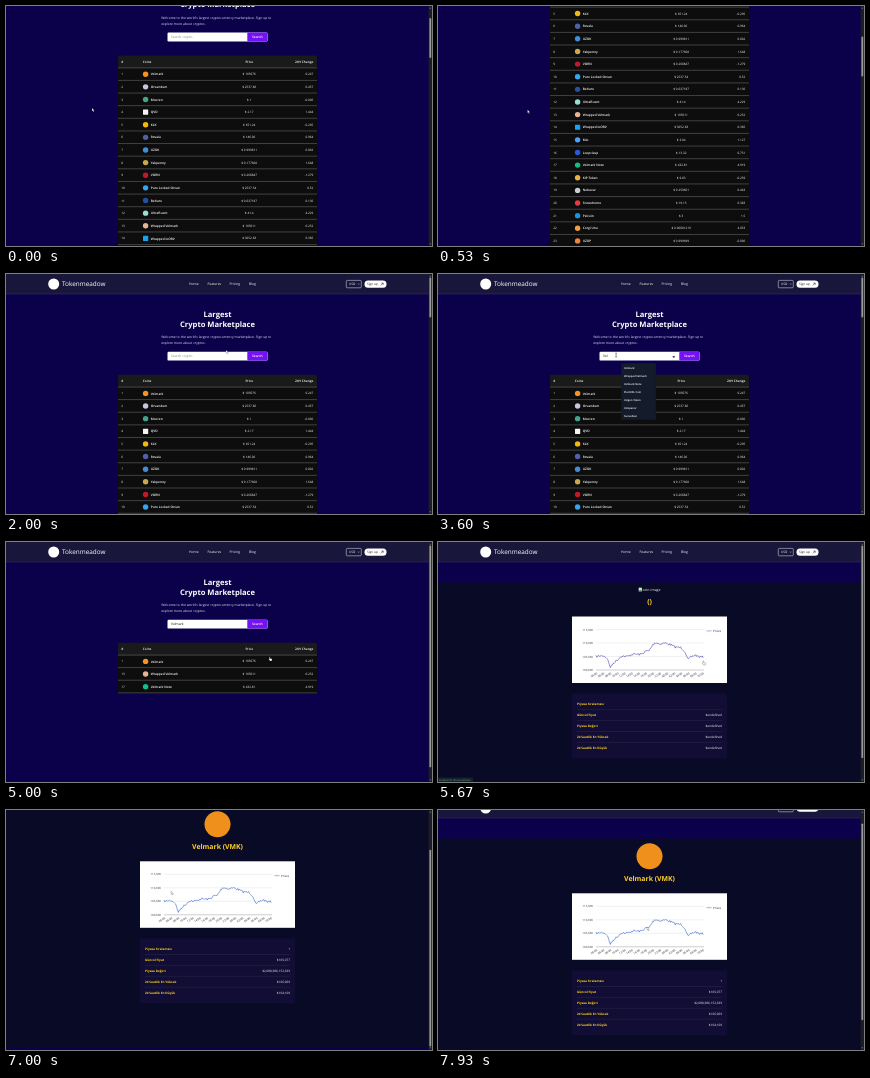
An HTML page for the animation above (8000 ms loop, 426 by 240 pixels).

```html
<!DOCTYPE html>
<html lang="en">
<head>
<meta charset="utf-8">
<title>Crypto Marketplace</title>
<style>
  html, body { margin: 0; width: 100%; height: 100%; overflow: hidden; background: #0b004a; }
  svg { display: block; width: 100vw; height: 100vh; font-family: "Open Sans", "Noto Sans", sans-serif; text-rendering: geometricPrecision; }
</style>
</head>
<body>
<svg id="stage" viewBox="0 0 426 240"></svg>
<script>
const LOOP = 8000, PITCH = 12.63, FIRST_ROW = 119.4, HOME_HEIGHT = 1400;
const GOLD = '#ffd21f', PURPLE = '#0b004a';

const coins = `Velmark|105076|0.247|#f7931a
Orvandum|2537.86|0.457|#c4c8d8
Mooren|1|-0.006|#3fa58c
QVD|2.17|1.444|#f4f4f4|s
KLK|651.24|-0.295|#f0b90b
Rovala|146.06|0.964|#4d61a8
UZDK|0.999811|0.002|#3d8fd8
Yakpenny|0.177608|1.648|#c9a94a
VORN|0.268847|-1.279|#c2182f
Puro Locked Orvan|2537.54|0.52|#35a5f0
Belturo|0.637187|0.136|#2450a4
Ultrafluent|41.4|4.229|#9adfd4
Wrapped Velmark|105011|0.252|#e6b394
Wrapped loORV|3052.83|0.366|#17a2ee|s
Mio|3.04|1.127|#4da2ff
Loopclasp|13.32|0.751|#2a5ada
Velmark Note|432.81|4.919|#0ac18e
KIP Token|9.03|-0.259|#e8b33c
Nebuvar|0.259601|0.443|#c9ccd0
Snowdrome|19.15|0.383|#e23b40
Pelcoin|3|1.5|#1295e2
Corgi Uno|0.00001219|4.053|#eda03c
UZDP|0.999699|-0.006|#ed8740
Fernia|0.15971|4.024|#dcdcdc
WORV|2536.85|0.47|#e0e4f0
Wrapped eORV|2712.3|0.333|#4d4fc0
Slimmark|86.25|-2.945|#345d9d
Kelance Bridged UZDM (KLK Quick Chain)|1.001|0.062|#26a17b
Orvina UZDe|1.001|0.019|#b9b9b9
Tavaro|315.73|0.486|#f26822
Jivestep|3.81|-0.245|#e6007a
PlainVEL Coin|28.97|12.515|#e9d53a
Velgen Token|4.54|0.424|#2cc9d8
Coinfort Wrapped VMK|105148|0.258|#1659e8
Gogo|0.00001114|4.399|#4c9a42
Lumo|6.91|1.024|#6ab4d8
Oakcrown|0.89|-0.312|#b06fd0`.split('\n').map((line, i) => {
  const [name, price, change, color, square] = line.split('|');
  return { rank: i + 1, name, price, change, color, square };
});
const suggestions = ['Velmark', 'Wrapped Velmark', 'Velmark Note', 'PlainVEL Coin', 'Velgen Token', 'Velspanor', 'Sunvelken'];

// Times in ms followed by values
const homeScroll = [[0, 51], [300, 110], [600, 178], [900, 246], [1200, 310], [1320, 326], [1430, 310], [1640, 120], [1860, 0]];
const coinScroll = [[6250, 0], [6750, 44], [7150, 44], [7600, 12]];
const pointer = [[0, 86, 102], [600, 90, 104], [1200, 99, 106], [1500, 130, 108], [2000, 220, 76], [2600, 200, 82],
  [3130, 178, 81], [3600, 178, 81], [3780, 193, 93], [3840, 193, 93], [4020, 250, 82], [4200, 250, 82], [5100, 265, 119],
  [5700, 265, 119], [6200, 240, 105], [7000, 165, 81], [7600, 195, 108], [7930, 209, 117]];
const typing = [[3340, 'V'], [3400, 'Ve'], [3470, 'Vel'], [3830, 'Velmark']];
const SUGGEST = [3350, 3830], FILTER = 4080, COIN_PAGE = 5470, CHART = 5540, LOADED = 5900;
const STATUS = [[1500, 1800], [5080, 5900]];

function at(keys, t) {
  if (t <= keys[0][0]) return keys[0].slice(1);
  for (let i = 1; i < keys.length; i++) {
    const a = keys[i - 1], b = keys[i];
    if (t < b[0]) return a.slice(1).map((v, k) => v + (b[k + 1] - v) * (t - a[0]) / (b[0] - a[0]));
  }
  return keys[keys.length - 1].slice(1);
}
const within = ([from, to], t) => t >= from && t < to;

const rect = (x, y, w, h, fill, extra = '') => `<rect x="${x}" y="${y}" width="${w}" height="${h}" fill="${fill}" ${extra}/>`;
const line = (x1, y, x2, color, w = .45) => `<path d="M${x1} ${y}H${x2}" stroke="${color}" stroke-width="${w}"/>`;
const disc = (x, y, r, fill) => `<circle cx="${x}" cy="${y}" r="${r}" fill="${fill}"/>`;
// y is the middle of the line of text
const text = (x, y, s, size = 3.2, { fill = '#fff', weight = 400, anchor = 'start', extra = '' } = {}) =>
  `<text x="${x}" y="${y + size * .35}" font-size="${size}" fill="${fill}" font-weight="${weight}" text-anchor="${anchor}" ${extra}>${s}</text>`;
const bold = { weight: 600 }, mid = { anchor: 'middle' }, end = { anchor: 'end' };

function navBar() {
  const links = [[183, 'Home'], [201.5, 'Features'], [223.5, 'Pricing'], [243, 'Blog']];
  return rect(0, 0, 426, 20, '#19163c') + line(0, 20, 426, '#38345c', .5) +
    disc(47.7, 10, 5.5, '#fff') + text(56, 10, 'Tokenmeadow', 6.4, { weight: 500 }) +
    links.map(([x, s]) => text(x, 10.2, s, 3.4, { weight: 500 })).join('') +
    rect(340.3, 6.4, 15, 7.4, 'none', 'rx="1" stroke="#fff" stroke-width=".45"') + text(343, 10.1, 'USD', 3.2) +
    '<path d="M351.8 9.6l.8.9.8-.9" fill="none" stroke="#fff" stroke-width=".4"/>' +
    rect(358.5, 6.6, 22, 7.1, '#fff', 'rx="3.5"') + text(361, 10.1, 'Sign up', 3.2, { fill: '#222', weight: 500 }) +
    '<path d="M374.8 11.4l2.4-2.4m-1.9 0h1.9v1.9" fill="none" stroke="#222" stroke-width=".5"/>';
}

function tableRow(c, i) {
  const y = FIRST_ROW + i * PITCH;
  const icon = c.square ? rect(137, y - 2.6, 5.2, 5.2, c.color, 'rx=".4"') : disc(139.6, y, 2.7, c.color);
  return text(115.3, y, c.rank, 3.1) + icon + text(144.7, y, c.name, 3.2, bold) +
    text(243.2, y, '$ ' + c.price, 3.1, mid) + text(307.3, y, c.change, 3.1, end) +
    line(112, y + 6.2, 311, '#808080');
}
const table = (list, height) => rect(112, 101, 199, height, '#0d0d0d', 'rx="2"') +
  '<path d="M112 113.2V102.8a2 2 0 0 1 2-2H309a2 2 0 0 1 2 2v10.4z" fill="#1a1a1a"/>' +
  text(115.3, 107, '#', 3.2, bold) + text(136.8, 107, 'Coins', 3.2, bold) +
  text(243.2, 107, 'Price', 3.2, { ...bold, ...mid }) + text(307.3, 107, '24H Change', 3.2, { ...bold, ...end }) +
  line(112, 113.1, 311, '#808080') + list.map(tableRow).join('');

function homePage() {
  const title = { weight: 700, anchor: 'middle' };
  return navBar() + text(211.5, 40.2, 'Largest', 7.6, title) + text(211.5, 50, 'Crypto Marketplace', 7.6, title) +
    text(155.3, 63, "Welcome to the world's largest cryptocurrency marketplace. Sign up to", 3.37, { fill: '#e3e3f0' }) +
    text(155.3, 69.3, 'explore more about cryptos.', 3.37, { fill: '#e3e3f0' }) +
    rect(161.5, 77.8, 100, 8.8, '#fff', 'rx="1.2"') + rect(241.3, 77.8, 20, 8.8, '#7411f5', 'rx="1"') +
    text(251.3, 82.2, 'Search', 3.3, { ...bold, ...mid }) +
    `<g id="query">${text(165, 82.2, '', 3.3)}</g>` +
    '<path id="arrow" d="M234.3 82.2h3l-1.5 1.8z" fill="#111"/>' +
    `<g id="full">${table(coins, 1240)}</g>` +
    `<g id="filtered">${table([0, 12, 16].map(i => coins[i]), 50.2)}</g>` +
    `<g id="suggest">${rect(183.3, 89.3, 34.6, 56.5, '#141b2a', 'rx=".5"')}${
      suggestions.map((s, i) => text(186, 93.6 + i * 8, s, 2.65, bold)).join('')}</g>`;
}

// Knots of the price line, relative to the chart's corner
const priceKnots = [[24, 40], [31, 39], [35, 41.5], [38.5, 51], [41, 47], [47, 42], [49, 39.5], [55, 40], [61, 37.5], [69, 38],
  [74, 34.5], [77, 34.5], [80, 29.5], [83, 26], [88, 27.5], [93, 26.5], [98, 28], [103, 30.5], [109, 31], [113, 35],
  [116, 43.5], [119, 40.5], [123, 38.5], [128, 40.5], [131.5, 40.5]];
function priceLine() {
  let seed = 7, d = '';
  for (let x = 24; x <= 131.5; x += .9) {
    seed = seed * 16807 % 2147483647;
    d += `${d ? 'L' : 'M'}${x.toFixed(1)} ${(at(priceKnots, x)[0] + (seed / 2147483647 - .5) * 2.2).toFixed(2)}`;
  }
  return `<path id="prices" d="${d}" fill="none" stroke="#3366cc" stroke-width=".6" stroke-linejoin="round"/>`;
}
function chart() {
  const dark = { fill: '#444' };
  let s = '';
  for (let i = 0; i < 4; i++) {
    const y = 13 + i * 13.5;
    s += line(24, y, 132, i < 3 ? '#ccc' : '#555', .3) + text(21, y, 115 - 5 * i + ',000', 2.9, { ...dark, ...end });
  }
  for (let i = 0; i < 16; i++) {
    const x = 25 + i * 7.1, label = String((4 + i * 2) % 24).padStart(2, '0') + ':00';
    s += text(x, 56.5, label, 2.8, { fill: '#222', anchor: 'end', extra: `transform="rotate(-32 ${x} 56.5)"` });
  }
  return rect(0, 0, 155, 66.5, '#fff') + `<g id="plot">${s}${priceLine()}${line(134.5, 14.4, 139.5, '#3366cc', .5)}${text(141, 14.4, 'Prices', 2.9, { fill: '#222' })}</g>`;
}

const facts = [['Piyasa Sıralaması', '1'], ['Güncel Fiyat', '$105,077'], ['Piyasa Değeri', '$2,088,386,152,639'],
  ['24 Saatlik En Yüksek', '$106,069'], ['24 Saatlik En Düşük', '$104,109']];
function factList(loaded) {
  return facts.map(([, value], i) => text(150, 10.8 + i * 10.9, loaded ? value : i ? '$undefined' : '', 3.1, end)).join('');
}
function coinPage() {
  const title = { fill: GOLD, weight: 700, anchor: 'middle' };
  const panel = rect(0, 0, 155, 65, '#110d34', 'rx="1.5"') + facts.map(([label], i) =>
    text(5, 10.8 + i * 10.9, label, 3.1, { fill: GOLD, weight: 700 }) +
    (i < 4 ? line(5, 16.2 + i * 10.9, 150, '#39365a', .35) : '')).join('');
  return rect(0, 40.5, 426, 240.5, '#090a26') + navBar() +
    `<g id="pending">${rect(200.7, 45.7, 3.2, 3.6, '#d8e4f4')}<path d="M200.7 49.3l1.6-1.8 1.6 1.8z" fill="#5a9a4a"/>${
      text(204.6, 47.8, 'coin-image', 3.5)}${text(211.5, 60, '()', 7, title)}</g>` +
    `<g id="ready">${disc(211.5, 58.2, 13, '#f0901c')}${text(211.5, 80.8, 'Velmark (VMK)', 6.9, title)}</g>` +
    `<g id="body"><g transform="translate(134 0)">${chart()}</g><g transform="translate(134 77)">${panel}<g id="waiting">${
      factList(false)}</g><g id="values">${factList(true)}</g></g></g>`;
}

const stage = document.getElementById('stage');
stage.innerHTML = rect(0, 0, 426, 240, PURPLE) +
  `<g id="home">${homePage()}</g><g id="coin">${coinPage()}</g>` +
  rect(422.6, 0, 3.4, 240, '#1c1c26') + '<path d="M423.4 2.6l.9-1.2.9 1.2zM423.4 237.4l.9 1.2.9-1.2z" fill="#9a9a9a"/>' +
  rect(423.4, 4, 1.8, 40, '#9a9a9a', 'id="thumb" rx=".9"') +
  `<g id="status">${rect(0, 235.4, 35, 4.6, '#17212b', 'rx=".6"')}${text(1, 237.7, 'localhost:5173/coin/velmark', 2.4, { fill: '#57b8a0' })}</g>` +
  `<g id="pointer"><path id="tip" d="M0 0v3.3l.8-.7.6 1.3.6-.3-.6-1.2h1z" fill="#fff" stroke="#111" stroke-width=".2"/>
   <path id="beam" d="M-.7-2h1.4M0-2v4M-.7 2h1.4" stroke="#111" stroke-width=".45" fill="none"/>
   <path id="hand" d="M0 0q.5-.4.8.2v1.3l1.5.4q.5.2.4.8l-.4 1.4h-1.6l-1.3-1.7.6-.3z" fill="#fff" stroke="#111" stroke-width=".25"/></g>`;

const $ = Object.fromEntries([...stage.querySelectorAll('[id]')].map(e => [e.id, e]));
const show = (e, on) => e.setAttribute('display', on ? 'inline' : 'none');
const move = (e, x, y) => e.setAttribute('transform', `translate(${x} ${y})`);
const queryText = $.query.firstChild;

function draw(t) {
  const onCoin = t >= COIN_PAGE, loaded = t >= LOADED, filtered = t >= FILTER;
  const scroll = at(onCoin ? coinScroll : homeScroll, t)[0];
  const height = onCoin ? (loaded ? 284 : 263) : filtered ? 252 : HOME_HEIGHT;
  show($.home, !onCoin);
  show($.coin, onCoin);
  move(onCoin ? $.coin : $.home, 0, -scroll);

  const typed = typing.filter(([start]) => t >= start).pop();
  queryText.textContent = typed ? typed[1] : 'Search crypto..';
  queryText.setAttribute('fill', typed ? '#111' : '#858585');
  show($.arrow, t >= 2600 && t < FILTER);
  show($.suggest, within(SUGGEST, t));
  show($.full, !filtered);
  show($.filtered, filtered);

  show($.pending, !loaded);
  show($.waiting, !loaded);
  show($.ready, loaded);
  show($.values, loaded);
  show($.plot, t >= CHART);
  $.prices.setAttribute('stroke', loaded ? '#3366cc' : '#4a45b5');
  move($.body, 0, loaded ? 95.3 : 74.5);

  $.thumb.setAttribute('y', 3.6 + scroll / height * 232.8);
  $.thumb.setAttribute('height', 240 / height * 232.8);
  show($.status, STATUS.some(span => within(span, t)));

  const [x, y] = at(pointer, t);
  const beam = !onCoin && scroll === 0 && x > 162 && x < 241 && y > 78 && y < 86.5;
  const hand = within([5000, 5800], t);
  move($.pointer, x, y);
  show($.beam, beam);
  show($.hand, hand);
  show($.tip, !beam && !hand);
}

const start = performance.now();
function tick() {
  draw((performance.now() - start) % LOOP);
  requestAnimationFrame(tick);
}
tick();
</script>
</body>
</html>
```
